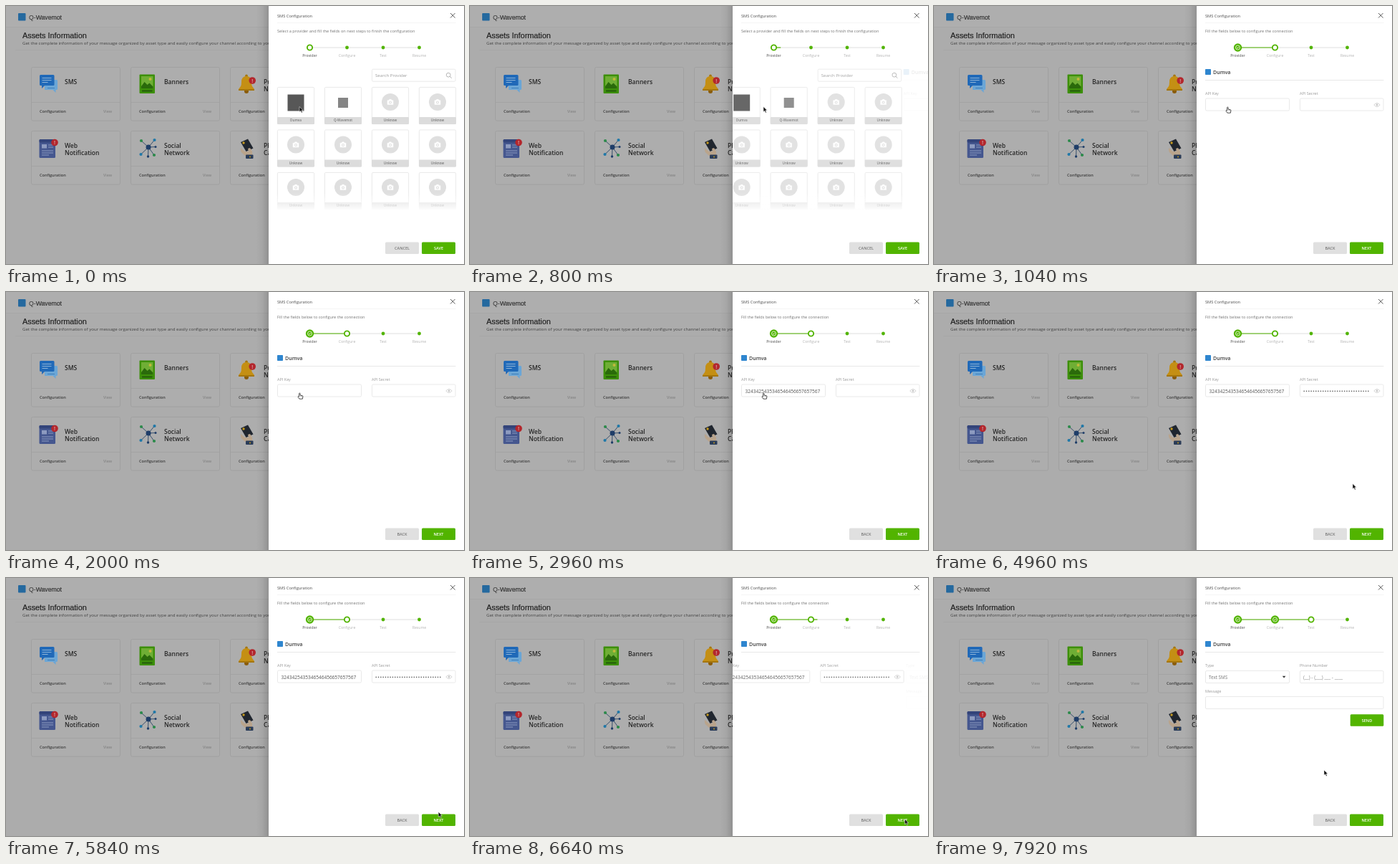
Recreate the animation shown at these times as an HTML page. Size 640x360 px, loop 8000 ms.

```html
<!DOCTYPE html>
<html lang="en">
<head>
<meta charset="utf-8">
<title>SMS Configuration</title>
<style>
  html, body { margin: 0; width: 100%; height: 100%; overflow: hidden; background: #acacac; }
  svg { display: block; width: 640px; height: 360px; font-family: "Open Sans", "Noto Sans", sans-serif; }
  .plain { font-family: "Liberation Sans", Arial, sans-serif; }
</style>
</head>
<body>
<svg id="stage" viewBox="0 0 640 360" xmlns="http://www.w3.org/2000/svg"></svg>
<script>
const LOOP = 8000;
const GREEN = '#52b400';
const BRAND = 'Dumva';
const APP = 'Q-Wavemot';
const KEY = '3243425435346546456657657567';

// Markup helpers
const text = (x, y, size, fill, str, extra = '') =>
  `<text x="${x}" y="${y}" font-size="${size}" fill="${fill}" ${extra}>${str}</text>`;
const rect = (x, y, w, h, fill, r = 0, extra = '') =>
  `<rect x="${x}" y="${y}" width="${w}" height="${h}" rx="${r}" fill="${fill}" ${extra}/>`;
const circle = (x, y, r, fill, extra = '') =>
  `<circle cx="${x}" cy="${y}" r="${r}" fill="${fill}" ${extra}/>`;
const path = (d, fill, extra = '') => `<path d="${d}" fill="${fill}" ${extra}/>`;
const stroke = (color, w = 1) => `stroke="${color}" stroke-width="${w}"`;
const line = (d, color, w) => path(d, 'none', stroke(color, w));
const group = (id, body) => `<g id="${id}">${body}</g>`;
const BOLD = 'font-weight="600"';
const MID = 'text-anchor="middle"';

// Dimmed page behind the panel
const alertDot = (x, y) =>
  circle(x, y, 4.8, '#b3262c') + text(x, y + 2.6, 7, '#dcbcbc', '!', `${MID} ${BOLD}`);

const icons = {
  sms: path('M54 103h16.500q1.500 0 1.500 1.500v11q0 1.500 -1.500 1.500h-1v4l-4 -4h-11.500z', '#6ba6d6') +
    line('M58 114.500h10', '#3f7fba', 1) +
    path('M48.500 96h17.500q1.500 0 1.500 1.500v12q0 1.500 -1.500 1.500h-12l-4 4v-4h-1.500q-1.500 0 -1.500 -1.500v-12q0 -1.500 1.500 -1.500z', '#2069b8') +
    line('M50.500 100.500h13M50.500 103.500h13M50.500 106.500h8', '#8fb5d8', 1),
  banner: rect(186.500, 95.5, 21.500, 26.500, '#3c8f0a', 1) + rect(189, 98, 16.500, 17, '#6fae35') +
    circle(201.500, 102, 2, '#c2b93c') +
    path('M189 112l4.500 -6l4 4l3 -2.500l5 5v2.500h-16.500z', '#2a6a0b') +
    line('M190 118.500h14.500', '#235a0a', 2),
  bell: circle(336, 97.500, 1.900, '#a5760d') + circle(336, 119, 3, '#8a5c0c') +
    path('M328 112q1 -2 1 -6q0 -8 7 -8t7 8q0 4 1 6l3 4v2h-22v-2z', '#c48f14') +
    line('M325 117h22', '#a5760d', 2) + alertDot(344.200, 104),
  web: rect(46.500, 186, 22.500, 26, '#45578f', 1.500) + rect(46.500, 186, 22.500, 4.500, '#33447a', 1.500) +
    rect(50, 193, 7, 5.500, '#8d9bc0') + line('M59 194h7M59 197h7M50 202h16M50 205h16M50 208h10', '#8d9bc0', 1) +
    alertDot(68, 190.500),
  social: line('M199 197L189 188M199 197L207.500 187M199 197L188.500 207M199 197L207 208M199 197L198.500 209.500M199 197L209 196.500', '#2c4766', .9) +
    circle(199, 197, 3.500, '#1f3d68') + circle(189, 188, 2.100, '#2b8a4a') + circle(207.500, 187, 2.100, '#1f78a8') +
    circle(188.500, 207, 2.100, '#1f78a8') + circle(207, 208, 2.100, '#2b8a4a') +
    circle(198.500, 210, 1.700, '#1f3d68') + circle(209, 196.500, 1.500, '#1f3d68'),
  phone: path('M328 190l10 -4.500l7.500 13l-10 4.500z', '#20262f') + circle(332, 191, 1.700, '#c49a20') +
    path('M328 198q-1 5 3 8l3 3h10v-6l-3 -5l-3 1l1 4h-5z', '#b9a48c') +
    rect(335, 207.500, 10.500, 5.500, '#2a3c58', 1) + circle(341, 210.500, 1, '#c49a20')
};

function card(x, y, icon, lines) {
  const title = lines.map((s, i) => text(x + 47, y + 23.5 + i * 10, 8.5, '#262626', s, BOLD)).join('');
  return rect(x + .5, y + .5, 124, 74.500, '#adadad', 2, stroke('#9e9e9e', .8)) +
    line(`M${x} ${y + 49.5}h125`, '#a0a0a0', .7) + icons[icon] + title +
    text(x + 12, y + 64, 5.55, '#3b3b3b', 'Configuration', BOLD) +
    text(x + 101, y + 64, 5.5, '#7b7b7b', 'View');
}

const page = rect(0, 0, 640, 360, '#acacac') + rect(0, 0, 640, 29, '#aeaeae') +
  line('M0 29.500h640', '#a4a4a4', .7) + line('M13 61.500h627', '#a5a5a5', .6) +
  rect(17, 10, 10.500, 10.500, '#25699f', 1) +
  text(32, 18.5, 8.7, '#333', `${APP.slice(0, 2)}<tspan ${stroke('#333', .2)}>${APP.slice(2)}</tspan>`, 'class="plain"') +
  text(23, 45, 10.85, '#202020', 'Assets Information', `class="plain" ${stroke('#202020', .2)}`) +
  text(23, 54, 6.1, '#414141', 'Get the complete information of your message organized by asset type and easily configure your channel according to your needs') +
  card(35, 85, 'sms', ['SMS']) + card(174, 85, 'banner', ['Banners']) +
  card(313, 85, 'bell', ['Push', 'Notification']) +
  card(35, 174, 'web', ['Web', 'Notification']) + card(174, 174, 'social', ['Social', 'Network']) +
  card(313, 174, 'phone', ['Phone', 'Calls']) +
  rect(349, 0, 18, 360, 'url(#shadow)');

// Panel parts
const button = (x, y, w, fill, color, label, id = '') =>
  rect(x, y, w, 16.5, fill, 1.5) +
  text(x + w / 2, y + 10.4, 5.5, color, label, `${MID} ${BOLD} ${id && `id="${id}"`}`);
const field = (x, y, w) => rect(x + .5, y + .5, w - 1, 17, '#fff', 1.5, stroke('#e4e4e4', .8));
const label = (x, y, s) => text(x, y, 5.5, '#989898', s);

const camera = (x, y) => circle(x, y, 12, '#dfdfdf') +
  path(`M${x - 4} ${y - 2.3}h1.800l1 -1.400h2.400l1 1.400h1.800v5.800h-8z`, '#fff', 'stroke="#fff" stroke-width=".5" stroke-linejoin="round"') +
  circle(x, y + .5, 2, '#dfdfdf') + circle(x, y + .5, 1, '#fff');

function tile(col, row) {
  const x = 379 + col * 66, y = 113 + row * 59.5, n = row * 4 + col;
  const art = n === 0 ? rect(x + 14.500, y + 10.500, 23, 23, '#575757')
    : n === 1 ? rect(x + 19, y + 15, 14, 14, '#858585')
    : camera(x + 26, y + 21);
  return rect(x + .4, y + .4, 51.200, 51.200, '#fff', 1.5, stroke('#e4e4e4', .8)) + art +
    rect(x, y + 42, 52, 10, '#dcdcdc', 1) +
    text(x + 26, y + 48.4, 4.6, '#777', [BRAND, APP][n] || 'Unknow', `${MID} ${BOLD}`);
}

let tiles = '';
for (let n = 0; n < 12; n++) tiles += tile(n % 4, n >> 2);

const providers = field(511, 87.7, 117.5) + text(516, 98.5, 6.1, '#9a9a9a', 'Search Provider') +
  circle(618.2, 96.2, 2.900, 'none', stroke('#999', .7)) + line('M620.300 98.300l2.400 2.400', '#999', .8) +
  tiles + rect(378, 258, 252, 28, 'url(#fade)');

const heading = rect(379, 88, 8, 8, '#2f86cf', .8) + text(390, 95, 7.1, '#3c3c3c', BRAND, BOLD) +
  line('M379 103.500h249.500', '#e2e2e2', .8);

let dots = '';
for (let i = 0; i < KEY.length; i++) dots += circle(517.2 + i * 3.32, 138.3, .85, '#666');

const keys = label(379, 123.5, 'API Key') + label(511, 123.5, 'API Secret') +
  field(379, 128.5, 118) + field(511, 128.5, 117.5) +
  text(384.5, 140.5, 6.55, '#555', '', 'id="key"') + group('secret', dots) +
  line('M614.800 138q4.200 -5 8.400 0q-4.200 5 -8.400 0z', '#c9c9c9', .8) + circle(619, 138, 1.400, '#c9c9c9');

const test = label(379, 123.8, 'Type') + label(511, 123.8, 'Phone Number') +
  field(379, 129, 118) + field(511, 129, 117.5) +
  text(384, 140.500, 6.3, '#777', 'Text SMS') + path('M486.800 136.800h4.600l-2.300 2.800z', '#333') +
  text(516, 140.500, 6.5, '#888', '(__) - (___) ___ - ____') +
  label(379, 160.3, 'Message') + field(379, 165, 249.5) +
  button(581.700, 190.2, 46.6, GREEN, '#fff', 'SEND');

const panel = rect(367, 0, 273, 360, '#fff') +
  text(379, 15.5, 5.7, '#4a4a4a', 'SMS Configuration') +
  line('M621 10l6.500 6.500M627.500 10l-6.500 6.500', '#444', .9) +
  line('M379 23.500h249.500', '#f0f0f0', .7) +
  text(379, 37.3, 5.58, '#737373', '', 'id="hint"') + group('steps', '') +
  `<g clip-path="url(#panelClip)">${group('providers', providers)}${group('heading', heading)}${group('keys', keys)}${group('test', test)}</g>` +
  button(530, 329.6, 47, '#e0e0e0', '#777', '', 'back') +
  button(581, 329.6, 47, GREEN, '#fff', '', 'next');

const arrow = path('M0 0v7.200l1.700 -1.500l1.300 2.900l1.300 -.6l-1.300 -2.800h2.300z', '#111', stroke('#fff', .5));
const hand = path('M-.4 1q.8 -1 1.500 0v2.500l3.200 .8q.8 .3 .6 1.200l-.6 3.200h-4.300l-2.100 -3q.3 -1.200 1.700 -.2z', '#fff',
  'stroke="#222" stroke-width=".8" stroke-linejoin="round"') + line('M1.800 4v1.500M3.200 4.300v1.400', '#222', .4);

const stage = document.getElementById('stage');
stage.innerHTML = `<defs>
  <clipPath id="panelClip"><rect x="367" y="0" width="273" height="360"/></clipPath>
  <linearGradient id="fade" x1="0" y1="0" x2="0" y2="1">
    <stop offset=".1" stop-color="#fff" stop-opacity="0"/><stop offset="1" stop-color="#fff"/>
  </linearGradient>
  <linearGradient id="shadow">
    <stop offset="0" stop-opacity="0"/><stop offset=".5" stop-opacity=".04"/><stop offset="1" stop-opacity=".16"/>
  </linearGradient></defs>` + page + panel +
  group('cursor', group('arrow', arrow) + group('hand', hand));

const el = Object.fromEntries(['providers', 'heading', 'keys', 'test', 'steps', 'hint', 'back', 'next',
  'key', 'secret', 'cursor', 'arrow', 'hand'].map(id => [id, document.getElementById(id)]));
const secretDots = [...el.secret.children];

// Stepper: fill counts the finished line segments, with a fraction for the growing one
const STEPS = [[424.5, 'Provider'], [476.5, 'Configure'], [527, 'Test'], [577.5, 'Resume']];
function stepper(current, fill) {
  let out = line(`M${STEPS[0][0]} 58H${STEPS[3][0]}`, '#d6d6d6', .8);
  STEPS.slice(0, 3).forEach(([x], i) => {
    const part = clamp(fill - i);
    if (part) out += line(`M${x} 58h${(STEPS[i + 1][0] - x) * part}`, GREEN, 1.2);
  });
  STEPS.forEach(([x, name], i) => {
    if (i < current) {
      out += circle(x, 58, 5.7, GREEN) + circle(x, 58, 3, 'none', stroke('#fff', .8)) +
        line(`M${x - 1.4} 58l1 1.100l1.900 -2`, '#fff', .8);
    } else if (i === current) out += circle(x, 58, 3.6, '#fff', stroke(GREEN, 1.9));
    else out += circle(x, 58, 2.4, GREEN);
    out += i ? text(x, 71.3, 5.2, '#b3b3b3', name, MID) : text(x, 71.3, 5.05, '#777', name, `${MID} ${BOLD}`);
  });
  return out;
}

// Timing
const SLIDE = 252, SLIDE_MS = 140, FILL_MS = 220, FIRST = 760, SECOND = 6602;
const clamp = v => Math.min(1, Math.max(0, v));
const span = (t, a, b) => clamp((t - a) / (b - a));
const ease = p => p < .5 ? 4 * p ** 3 : 1 - 4 * (1 - p) ** 3;
const MOVES = [
  [4240, 4900, 585, 267.5],
  [5360, 6080, 607.5, 336.5],
  [7040, 7760, 545, 268]
];

function place(node, dx, opacity) {
  node.setAttribute('transform', `translate(${dx.toFixed(2)} 0)`);
  node.setAttribute('opacity', opacity.toFixed(3));
  node.setAttribute('display', opacity > 0 ? 'inline' : 'none');
}

function setStep(step, fill) {
  el.steps.innerHTML = stepper(step, fill);
  el.hint.textContent = step
    ? 'Fill the fields below to configure the connection'
    : 'Select a provider and fill the fields on next steps to finish the configuration';
  el.back.textContent = step ? 'BACK' : 'CANCEL';
  el.next.textContent = step ? 'NEXT' : 'SAVE';
}

function draw(t) {
  const a = ease(span(t, FIRST, FIRST + SLIDE_MS));
  const b = ease(span(t, SECOND, SECOND + SLIDE_MS));
  place(el.providers, -SLIDE * a, 1 - a);
  place(el.heading, SLIDE * (1 - a), a);
  place(el.keys, SLIDE * (1 - a - b), a * (1 - b));
  place(el.test, SLIDE * (1 - b), b);
  setStep((a > .5) + (b > .5), span(t, FIRST, FIRST + FILL_MS) + span(t, SECOND, SECOND + FILL_MS));

  el.key.textContent = KEY.slice(0, Math.round(KEY.length * span(t, 2160, 2880)));
  const typed = Math.round(KEY.length * span(t, 2960, 3600));
  secretDots.forEach((d, i) => d.setAttribute('display', i < typed ? 'inline' : 'none'));

  let x = 410, y = 140.500;
  for (const [from, to, tx, ty] of MOVES) {
    const p = ease(span(t, from, to));
    x += (tx - x) * p;
    y += (ty - y) * p;
  }
  el.cursor.setAttribute('transform', `translate(${x.toFixed(2)} ${y.toFixed(2)})`);
  const pointing = t >= 880 && t < 3200;
  el.arrow.setAttribute('display', pointing ? 'none' : 'inline');
  el.hand.setAttribute('display', pointing ? 'inline' : 'none');
}

const start = performance.now();
function tick() {
  draw((performance.now() - start) % LOOP);
  requestAnimationFrame(tick);
}
tick();
</script>
</body>
</html>
```
